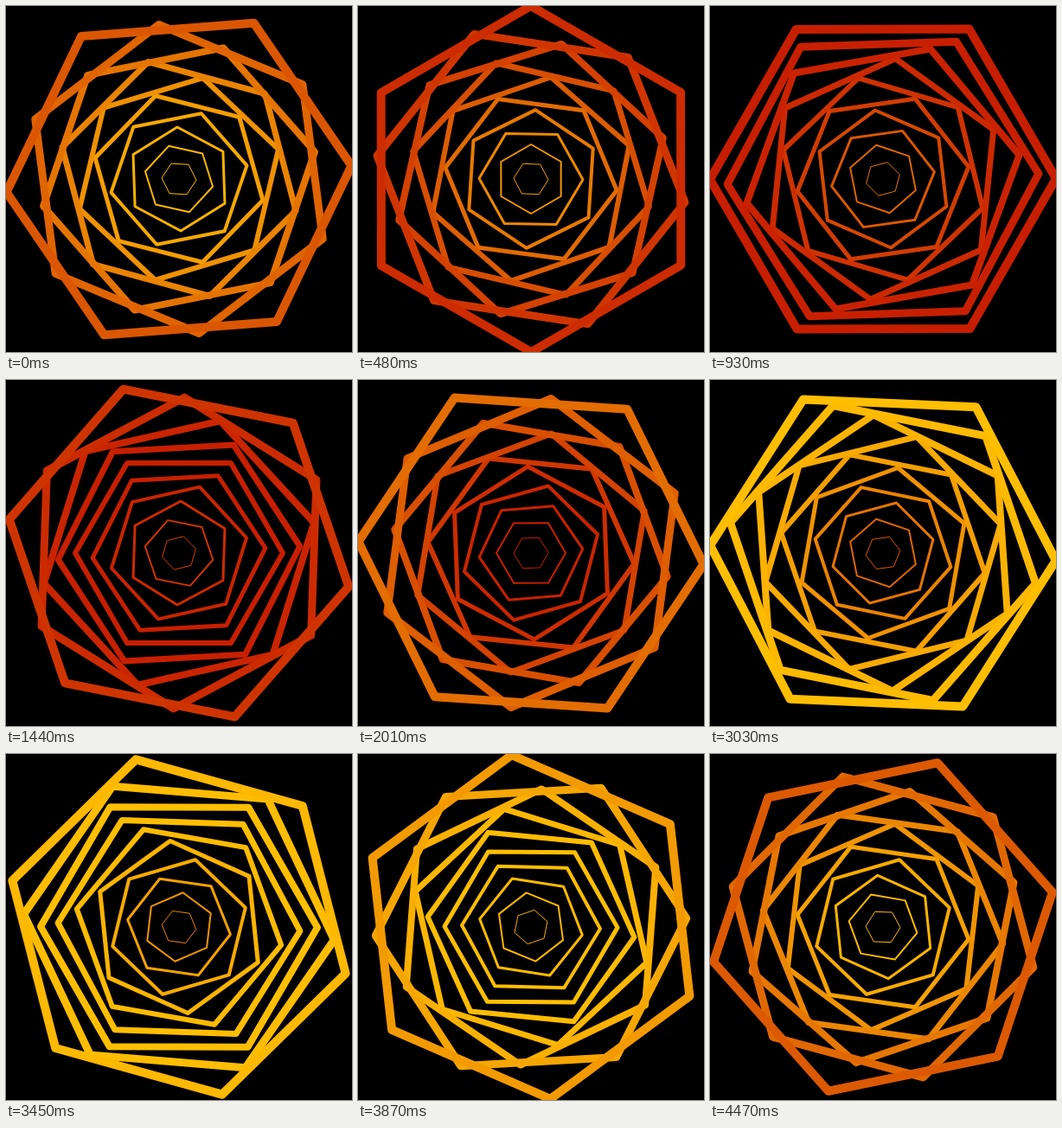
An HTML page with a canvas that plays this animation: 400 px wide and 400 px high, repeating every 4.5 s.

```html
<!DOCTYPE html>
<html lang="en">
<head>
<meta charset="utf-8">
<title>Twisting hexagons</title>
<style>
  html, body { margin: 0; width: 100%; height: 100%; overflow: hidden; background: #000; }
  canvas { display: block; }
</style>
</head>
<body>
<canvas id="stage" width="400" height="400"></canvas>
<script>
const ctx = document.getElementById('stage').getContext('2d');
const LOOP = 4500, STEP = 30, RINGS = 10, TAU = 2 * Math.PI;
const RED = [200, 30, 0], GOLD = [255, 191, 0];

const mix = (a, b, f) => `rgb(${a.map((v, k) => Math.round(v + (b[k] - v) * f))})`;

function hexagon(radius, angle) {
  ctx.beginPath();
  for (let k = 0; k < 6; k++) {
    const a = angle + k * TAU / 6;
    ctx.lineTo(200 + radius * Math.cos(a), 200 + radius * Math.sin(a));
  }
  ctx.closePath();
  ctx.stroke();
}

function draw(time) {
  const progress = Math.floor((time % LOOP) / STEP) * STEP / LOOP;
  ctx.fillStyle = '#000';
  ctx.fillRect(0, 0, 400, 400);
  ctx.lineJoin = 'round';
  for (let i = 1; i <= RINGS; i++) {
    // Each ring runs 3% of the loop ahead of the one inside it.
    const wave = Math.cos(TAU * (progress + 0.03 * i));
    ctx.strokeStyle = mix(RED, GOLD, (1 + wave) / 2);
    ctx.lineWidth = i;
    hexagon(20 * i, -Math.PI * wave);
  }
}

function tick() {
  draw(performance.now());
  requestAnimationFrame(tick);
}
tick();
</script>
</body>
</html>
```
